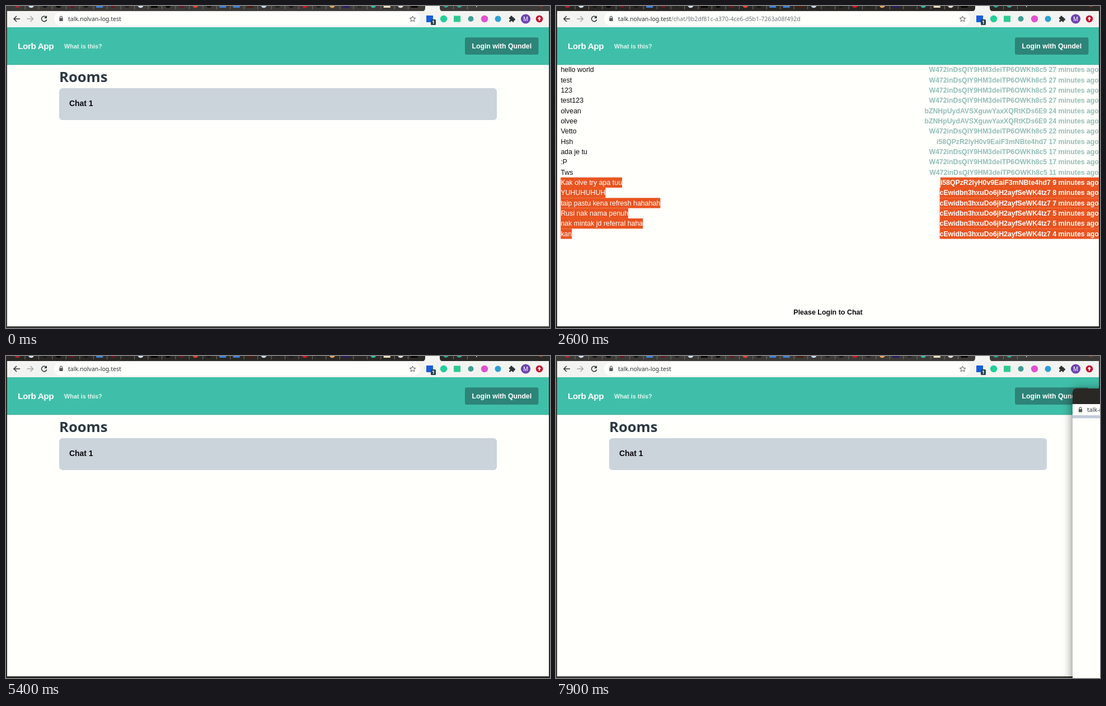
Animation, 972 px wide and 576 px high, one loop 8000 ms. Source, as an HTML page:

```html
<!DOCTYPE html>
<html lang="en">
<head>
<meta charset="utf-8">
<title>Chat rooms</title>
<style>
  html, body { margin: 0; width: 100%; height: 100%; overflow: hidden; background: #fffffc; }
  svg { display: block; width: 972px; height: 576px; }
  text { white-space: pre; font-family: "Liberation Sans", Arial, sans-serif; }
  .ui { font-family: "Noto Sans", "Open Sans", sans-serif; }
  .b { font-weight: 700; }
  .end { text-anchor: end; }
  .mid { text-anchor: middle; }
  #popup { filter: drop-shadow(0 3px 9px rgba(0, 0, 0, .55)); }
</style>
</head>
<body>
<svg id="stage" viewBox="0 0 972 576" xmlns="http://www.w3.org/2000/svg"></svg>
<script>
const LOOP = 8000, STEP = 100;
const HOST = 'talk.nolvan-log.test';
const ROOM = '9b2df81c-a370-4ce6-d5b1-7263a08f492d';
const PAPER = '#fffffc', INK = '#2e3436';

const USERS = [
  'W472inDsQlY9HM3deiTP6OWKh8c5',
  'bZNHpUydAVSXguwYaxXQRtKDs6E9',
  'i58QPzR2lyH0v9EaiF3mNBte4hd7',
  'cEwidbn3hxuDo6jH2ayfSeWK4tz7'
];
// message, user, minutes ago
const MESSAGES = [
  ['hello world', 0, 27], ['test', 0, 27], ['123', 0, 27], ['test123', 0, 27],
  ['olvean', 1, 24], ['olvee', 1, 24], ['Vetto', 0, 22], ['Hsh', 2, 17],
  ['ada je tu', 0, 17], [':P', 0, 17], ['Tws', 0, 11], ['Kak olve try apa tuu', 2, 9],
  ['YUHUHUHUH', 3, 8], ['taip pastu kena refresh hahahah', 3, 7],
  ['Rusi nak nama penuh', 3, 5], ['nak mintak jd referral haha', 3, 5], ['kan', 3, 4]
];
const ROW_TOP = 105, ROW_H = 18.33;

const rect = (x, y, w, h, fill, r = 0, extra = '') =>
  `<rect x="${x}" y="${y}" width="${w}" height="${h}" rx="${r}" fill="${fill}" ${extra}/>`;
const dot = (x, y, r, fill) => `<circle cx="${x}" cy="${y}" r="${r}" fill="${fill}"/>`;
const line = (d, color, w = 1.5) =>
  `<path d="${d}" fill="none" stroke="${color}" stroke-width="${w}"/>`;
const text = (x, y, size, str, fill, cls = '', extra = '') =>
  `<text x="${x}" y="${y}" font-size="${size}" fill="${fill}" class="${cls}" ${extra}>${str}</text>`;
const group = (id, body) => `<g id="${id}">${body}</g>`;
const lock = (x, y) =>
  rect(x - 3.2, y - 1.5, 6.4, 5.5, '#55585a', .8) +
  line(`M${x - 2} ${y - 1}v-1.6a2 2 0 0 1 4 0v1.6`, '#55585a', 1.1);

function tabStrip() {
  const icons = ['#b3202f', '#cfe0f5', '#171615', '#000', '#6d1420', '#171615', '#3f82d8',
    '#6d1420', '#242220', '#d8e4f4', '#000', '#050505', '#6d1420', '#e5452f', '#171615',
    '#3f82d8', '#3f82d8', '#4a1a0c', '#c8dcf2', '#242220', '#1c1b1a', '#e0121f', '#242220',
    '#e8a35a', '#2a1a66', '#2a2826', '#35b9a2', '#f2e3c2', '#e6dedc', '#000'];
  const square = [6, 10, 15, 16, 17, 24, 27, 29];
  let s = '';
  icons.forEach((c, i) => {
    const x = 20.5 + i * 24.45;
    s += square.includes(i) ? rect(x - 6, -6, 12, 9, c) : dot(x, -2, 5.2, c);
    if (i < 29) s += rect(x + 13, 0, 1, 6, '#77736d');
  });
  s += `<path d="M743 9.5q6 0 6-6V0h26v3.5q0 6 6 6z" fill="#f4f5f2"/>`;
  s += dot(786, -2, 5, '#2aa58f') + dot(810, -2, 5, '#2aa58f');
  s += rect(799, 0, 1, 6, '#77736d') + rect(824, 0, 1, 6, '#77736d');
  return s + rect(840, 0, 1.5, 2, '#ccc') + dot(956, -4, 5.5, '#b5362b');
}

function toolbar() {
  return rect(2, 9, 968, 29, '#f3f4f1') + rect(86, 11, 654, 24, PAPER, 12) +
    line('M25 23H14.5M19 18l-5 5 5 5', INK) +
    line('M37.5 23H48M43.5 18l5 5-5 5', '#a5a7a6') +
    line('M71.5 19.6a4.7 4.7 0 1 0 1.2 4.6', INK) +
    `<path d="M73 17v5h-5z" fill="${INK}"/>` + lock(98.5, 23) +
    line('M726.5 18l1.5 3.4 3.7.3-2.8 2.4.9 3.7-3.3-2-3.3 2 .9-3.7-2.8-2.4 3.7-.3z', '#55585a', 1) +
    rect(751, 17, 12, 12, '#175ddc') + rect(759, 24, 9, 10, '#27424d', 1.5) +
    text(763.5, 32, 8.5, '1', '#fff', 'ui b mid') +
    dot(782, 23, 6.2, '#20cf96') + rect(800, 17.5, 12, 11, '#2bcb8f') +
    dot(830.5, 23, 5, '#3e9c94') + dot(855, 23, 6.2, '#e052cd') + dot(879, 23, 5.5, '#2d9fd2') +
    rect(899, 20, 8.5, 8.5, INK, 1) + dot(903, 19.3, 1.9, INK) + dot(908, 24, 1.9, INK) +
    dot(899.2, 24.5, 1.5, '#f3f4f1') + dot(903.2, 28.3, 1.5, '#f3f4f1') +
    dot(928.5, 23, 8.6, '#6f45ae') + text(928.5, 26.7, 10, 'M', '#fff', 'ui mid') +
    dot(953, 23, 6.3, '#c5102c') +
    `<path d="M953 19l3.2 3.8h-2v3.4h-2.4v-3.4h-2z" fill="#fff"/>` +
    text(111, 27, 10.55, HOST + `<tspan id="path" fill="#70757a">/chat/${ROOM}</tspan>`, INK, 'ui');
}

const navbar = () =>
  rect(2, 38, 968, 67, '#3fbfa9') + rect(2, 104.3, 968, 1, '#38a994') +
  text(21, 77.2, 15.28, 'Lorb App', '#fff', 'b', 'letter-spacing="-.38"') +
  text(104, 75.6, 10.9, 'What is this?', '#def7f0', 'b') +
  rect(819.2, 55.7, 133, 32.2, 'none', 4, 'id="ring" stroke="#101010" stroke-width="1.5"') +
  rect(820, 56.3, 131.4, 30.7, '#2d8478', 3, 'id="login"') +
  text(832.5, 75.8, 12.22, 'Login with Qundel', '#fff', 'b');

const home = () =>
  text(95, 136, 25.6, 'Rooms', '#2b3843', 'ui b') +
  rect(95, 147, 782, 57, '#cbd3db', 6) +
  text(113, 179.3, 13.95, 'Chat 1', '#08080c', 'b');

const skeleton = () => [108.5, 132.8, 157.2].map(y => rect(2, y, 726, 12.3, '#cbd3db', 3)).join('');

const messages = () => MESSAGES.map(([msg, user, min], i) => {
  const y = (ROW_TOP + i * ROW_H + 13.4).toFixed(2);
  return `<g class="row">` + text(8.4, y, 12.42, msg, '#0c0c0c') +
    text(969.8, y, 12.28, `${USERS[user]} ${min} minutes ago`, '#92bdb7', 'b end') + '</g>';
}).join('');

const popup = () =>
  `<path d="M0 540V6q0-6 6-6h380q6 0 6 6v534z" fill="${PAPER}"/>` +
  `<path d="M0 28V6q0-6 6-6h380q6 0 6 6v22z" fill="#2a2825"/>` +
  text(196, 18, 11.15, 'Untitled - Qundel Morave', '#fff', 'ui b mid') +
  group('blank', rect(0, 49, 392, 1, '#a9aeb6') +
    `<circle cx="14" cy="38.5" r="4.8" fill="none" stroke="#55585a"/>` +
    rect(13.4, 37.7, 1.2, 3.6, '#55585a') + rect(13.4, 35.6, 1.2, 1.2, '#55585a') +
    text(26, 42.3, 10.6, `<tspan fill="#70757a">about:</tspan>blank`, INK, 'ui')) +
  group('loaded', lock(14, 38.5) + text(26, 42.3, 10.6, 'talk-nolvan.test', INK, 'ui') +
    rect(0, 48, 392, 5.3, '#c2cbdc'));

const stage = document.getElementById('stage');
stage.innerHTML =
  rect(0, 0, 972, 576, '#3c3a37', 0, 'id="frame"') + tabStrip() +
  rect(2, 38, 968, 535, PAPER) + toolbar() + navbar() +
  group('home', home()) + group('skeleton', skeleton()) + group('messages', messages()) +
  text(486, 552.4, 12.47, 'Please Login to Chat', '#0a0a0a', 'b mid', 'id="please"') +
  group('bubble', rect(1.5, 555.5, 322, 18, '#f1f2ef', 2, 'id="bubbleBox" stroke="#d5d7d4"') +
    text(6, 568.6, 11.35, '', '#6c6f70', 'ui', 'id="bubbleText"')) +
  rect(545, 556.5, 22, 16.5, '#f6f7f3', 0, 'id="seed"') +
  group('popup', popup());

const el = {};
stage.querySelectorAll('[id]').forEach(n => el[n.id] = n);
const show = (node, on) => node.style.display = on ? '' : 'none';

// selection boxes behind each half of a row
const rows = [...stage.querySelectorAll('.row')].map((row, i) => {
  const labels = [...row.querySelectorAll('text')];
  const marks = labels.map(label => {
    const w = label.getComputedTextLength();
    const x = label.classList.contains('end') ? 969.8 - w : 8.4;
    row.insertAdjacentHTML('afterbegin', rect(x, ROW_TOP + i * ROW_H, w, ROW_H, '#e95420'));
    return row.firstChild;
  });
  return { labels, marks };
});

// from, to, opacity, box width, label
const ROOM_LINK = `…${HOST.slice(5)}/…/${ROOM.slice(0, 33)}…`;
const BUBBLES = [
  [1600, 1700, .35, 322, ROOM_LINK],
  [1700, 2100, 1, 322, ROOM_LINK],
  [2100, 2200, .5, 322, ROOM_LINK],
  [4400, 4500, .35, 155.5, 'https://' + HOST],
  [4500, 5400, 1, 155.5, 'https://' + HOST],
  [6400, 7500, 1, 322, 'Waiting for api.qundel.test…']
];
// time, x, y of the dragged window
const DRAG = [
  [6200, 360, 315], [6300, 360, 315], [6400, 385, 285], [6800, 600, 42], [6900, 630, 34],
  [7000, 654, 47], [7200, 690, 58], [7300, 690, 58], [7900, 923, 58]
];

function along(keys, t) {
  const i = keys.findIndex(k => k[0] > t);
  if (i < 0) return keys[keys.length - 1].slice(1);
  const [a, b] = [keys[i - 1], keys[i]], p = (t - a[0]) / (b[0] - a[0]);
  return [1, 2].map(n => a[n] + (b[n] - a[n]) * p);
}

function render(time) {
  const t = Math.floor(time / STEP) * STEP;
  const within = (a, b) => t >= a && t < b;
  const chat = within(1800, 4800);

  el.frame.setAttribute('fill', within(1600, 6100) ? '#2a2825' : '#3c3a37');
  el.login.setAttribute('fill', within(500, 800) || within(5600, 6200) ? '#2b70ac' : '#2d8478');
  show(el.ring, within(5800, 6100));
  show(el.path, chat);
  show(el.home, !chat);
  show(el.please, chat);
  show(el.skeleton, within(1800, 2000));
  show(el.messages, within(2000, 4800));

  const first = within(2700, 3100) ? 5 : within(2600, 2700) ? 11 : rows.length;
  rows.forEach(({ labels, marks }, i) => {
    marks.forEach(m => show(m, i >= first));
    labels.forEach(l => l.style.fill = i >= first ? '#fff' : '');
  });

  const bubble = BUBBLES.find(([a, b]) => within(a, b));
  show(el.bubble, bubble);
  if (bubble) {
    el.bubble.style.opacity = bubble[2];
    el.bubbleBox.setAttribute('width', bubble[3]);
    el.bubbleText.textContent = bubble[4];
  }

  show(el.seed, within(6100, 6200));
  show(el.popup, t >= 6200);
  if (t >= 6200) {
    el.popup.setAttribute('transform', `translate(${along(DRAG, t)})`);
    show(el.blank, t < 7600);
    show(el.loaded, t >= 7600);
  }
}

const start = performance.now();
function tick() {
  render((performance.now() - start) % LOOP);
  requestAnimationFrame(tick);
}
tick();
</script>
</body>
</html>
```
